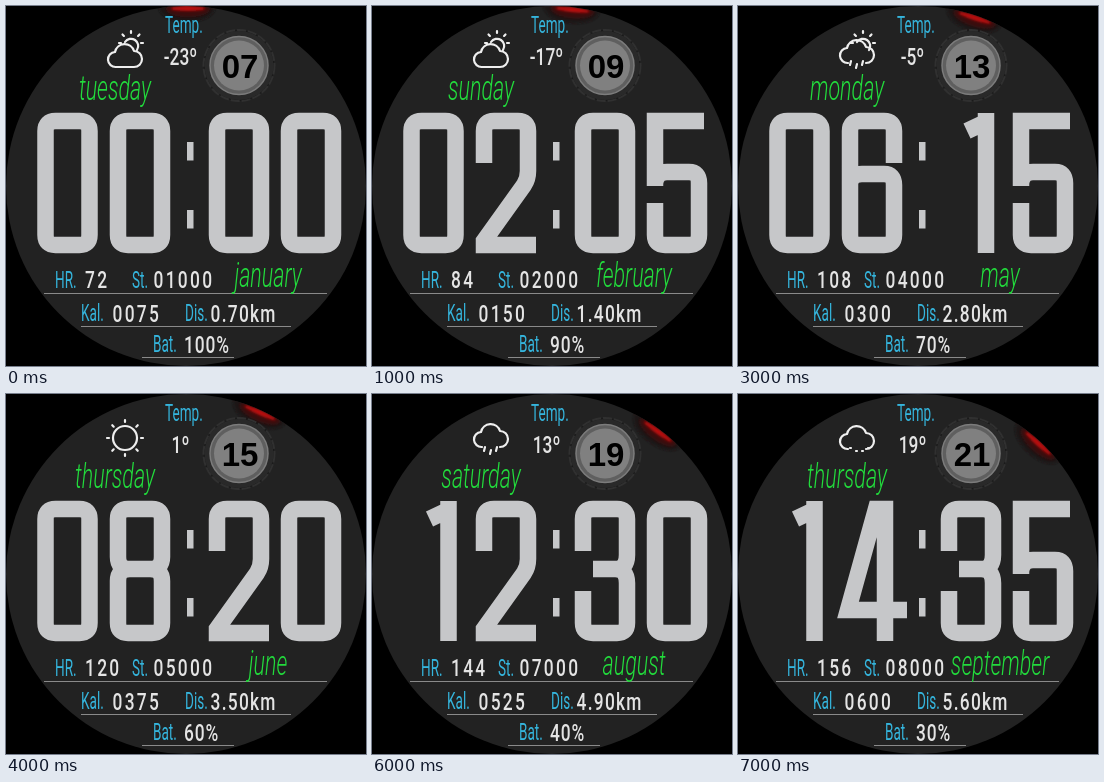
These frames come from a looping animation (360x360 px, 8 s). An HTML page:

```html
<!DOCTYPE html>
<html lang="en">
<head>
<meta charset="utf-8">
<title>Watch face</title>
<style>
  html, body { margin: 0; height: 100%; overflow: hidden; background: #000; }
  svg { display: block; width: 100vw; height: 100vh; }
  text { font-family: Roboto, "Open Sans", sans-serif; }
  .label { fill: #35b5dd; font-size: 23px; }
  .value { fill: #e4e4e4; font-size: 23.5px; font-weight: 500; }
  .script { fill: #22dc3c; font-size: 35px; font-weight: 300; font-style: italic; text-anchor: middle; }
  #date { font: bold 33px "Liberation Sans", sans-serif; text-anchor: middle; }
  #weather { fill: none; stroke: #eee; stroke-width: 2.2; stroke-linecap: round; stroke-linejoin: round; }
  #clock path { fill: none; stroke: #c6c7c9; stroke-width: 16.5; }
</style>
</head>
<body>
<svg viewBox="0 0 360 360">
  <defs>
    <clipPath id="dial"><circle cx="180" cy="180" r="180"/></clipPath>
    <filter id="soft" x="-30%" y="-60%" width="160%" height="220%"><feGaussianBlur stdDeviation="1.2"/></filter>
  </defs>
  <circle cx="180" cy="180" r="180" fill="#222"/>
  <g clip-path="url(#dial)">
    <g id="second">
      <ellipse cx="181" cy="2" rx="28" ry="14" fill="#1c1314" filter="url(#soft)"/>
      <ellipse cx="182" cy="3" rx="22" ry="8" fill="#3a0d0d" filter="url(#soft)"/>
      <ellipse cx="182" cy="2.5" rx="17" ry="2.5" fill="#b80c0c" filter="url(#soft)"/>
    </g>
  </g>
  <g fill="none">
    <circle cx="233" cy="59.5" r="35" fill="#292929" stroke="#191919"/>
    <circle cx="233" cy="59.5" r="35.5" stroke="#303030" stroke-width="2" stroke-dasharray="9 2"/>
    <circle cx="233" cy="59.5" r="29" fill="#5f5f5f" stroke="#7c7c7c" stroke-width="1.5"/>
    <circle cx="233" cy="59.5" r="25" fill="#808080"/>
  </g>
  <text id="date" x="234" y="71.5"></text>
  <path id="weather"/>
  <g id="clock"></g>
  <path d="M181 136h6.5v18.5h-6.5zM181 204h6.5v18.5h-6.5z" fill="#c6c7c9"/>
  <path d="M38 287.5H321M75 320.5H285M136 351.5H228" stroke="#8a8a8a"/>
  <g id="texts"></g>
</svg>
<script>
const STEP = 1000, COUNT = 8;
const $ = id => document.getElementById(id);
const svgNode = (tag, attrs, parent) => {
  const node = document.createElementNS('http://www.w3.org/2000/svg', tag);
  for (const key in attrs) node.setAttribute(key, attrs[key]);
  return parent.appendChild(node);
};

const LABEL = 0.59, VALUE = 0.74, SCRIPT = 0.615;  // condensed type styles
const addText = (type, condense, x, y, content = '', attrs = {}) => {
  const node = svgNode('text', {
    class: type, transform: `translate(${x} ${y}) scale(${condense} 1)`, ...attrs
  }, $('texts'));
  node.textContent = content;
  return node;
};
const label = (x, y, content) => addText('label', LABEL, x, y, content);
const value = (x, y, spacing) => addText('value', VALUE, x, y, '', { 'letter-spacing': spacing });
const script = (x, y) => addText('script', SCRIPT, x, y);

label(159, 27, 'Temp.');
label(49, 282, 'HR.');
label(126, 282, 'St.');
label(75, 315, 'Kal.');
label(179, 315, 'Dis.');
label(147, 346, 'Bat.');

const temp = addText('value', VALUE, 174.5, 59, '', { 'text-anchor': 'middle' });
const heart = value(79, 282, 3.1);
const steps = value(147.5, 282, 3.1);
const energy = value(106.5, 316, 3.1);
const distance = value(204.5, 316, 1.7);
const battery = value(178, 347, 1.2);
const weekday = script(109, 94);
const month = script(262, 281);

// Digits in a 60 x 140 cell, drawn as thick strokes
const hook = 'M8 50V18Q8 8 18 8H42Q52 8 52 18';
const bowl = 'V122Q52 132 42 132H18Q8 132 8 122V90';
const GLYPHS = {
  0: 'M18 8H42Q52 8 52 18V122Q52 132 42 132H18Q8 132 8 122V18Q8 8 18 8Z',
  1: 'M26 18L45 9M45 0V140',
  2: hook + 'V58Q52 66 48 72L8 128V132H60',
  3: hook + 'V54Q52 68 40 68H18M40 68Q52 68 52 82' + bowl,
  4: 'M65 109H6L34 8H43V140',
  5: 'M57 8H8V73M8 70Q10 59 20 59H42Q52 59 52 70' + bowl,
  6: 'M52 50V18Q52 8 42 8H18Q8 8 8 18V122Q8 132 18 132H42Q52 132 52 122V72Q52 61 42 61H20Q10 61 8 70',
  8: 'M20 68Q8 68 8 56V18Q8 8 18 8H42Q52 8 52 18V56Q52 68 40 68ZM20 68Q8 68 8 80V122Q8 132 18 132H42Q52 132 52 122V80Q52 68 40 68'
};
const digits = [31.5, 104, 203, 275].map(x =>
  svgNode('path', { transform: `translate(${x} 107)` }, $('clock')));

const cloud = (top, bottom) =>
  `M110 ${top + 24}a7.5 7.5 0 0 1-1-15a9.8 9.8 0 0 1 19-1a7.8 7.8 0 0 1 0 16` + bottom;
const rays = (cx, cy, inner, outer, from, to) => {
  let d = '';
  for (let k = from; k <= to; k++) {
    const c = Math.cos(k * Math.PI / 4), s = Math.sin(k * Math.PI / 4);
    d += `M${cx + inner * c} ${cy + inner * s}L${cx + outer * c} ${cy + outer * s}`;
  }
  return d;
};
const behind = y => `M119 ${y - 1}a7 7 0 1 1 12 8` + rays(125, y, 10, 12, -4, 0);
const drops = y => [113, 119, 125].map((x, k) => `M${x} ${y + k % 2 * 3}l-1 4`).join('');
const dots = [112, 118, 124, 130].map((x, k) => `M${x} ${k % 3 ? 57 : 54}h1`).join('');
const ICONS = {
  partly: cloud(37, 'Z') + behind(37),
  showers: cloud(33, '') + behind(37) + drops(55),
  sun: 'M107 44a12 12 0 1 0 24 0a12 12 0 1 0-24 0' + rays(119, 44, 16, 18, 0, 7),
  rain: cloud(29, '') + drops(53),
  drizzle: cloud(31, '') + dots
};

const WEATHER = ['partly', 'partly', 'showers', 'showers', 'sun', 'rain', 'rain', 'drizzle'];
const DAYS = ['tuesday', 'sunday', 'tuesday', 'monday', 'thursday', 'friday', 'saturday', 'thursday'];
const MONTHS = ['january', 'february', 'april', 'may', 'june', 'july', 'august', 'september'];
const pad = (n, size) => String(n).padStart(size, '0');

function show(i) {
  const time = pad(2 * i, 2) + pad(5 * i, 2);
  digits.forEach((path, k) => path.setAttribute('d', GLYPHS[time[k]]));
  $('second').setAttribute('transform', `rotate(${6 * i} 180 180)`);
  $('weather').setAttribute('d', ICONS[WEATHER[i]]);
  $('date').textContent = pad(7 + 2 * i, 2);
  temp.textContent = 6 * i - 23 + 'º';
  heart.textContent = 72 + 12 * i;
  steps.textContent = pad(1000 * (i + 1), 5);
  energy.textContent = pad(75 * (i + 1), 4);
  distance.textContent = (0.7 * (i + 1)).toFixed(2) + 'km';
  battery.textContent = 100 - 10 * i + '%';
  weekday.textContent = DAYS[i];
  month.textContent = MONTHS[i];
}

let shown = -1;
function tick() {
  const i = Math.floor(performance.now() / STEP) % COUNT;
  if (i !== shown) show(shown = i);
  requestAnimationFrame(tick);
}
tick();
</script>
</body>
</html>
```
